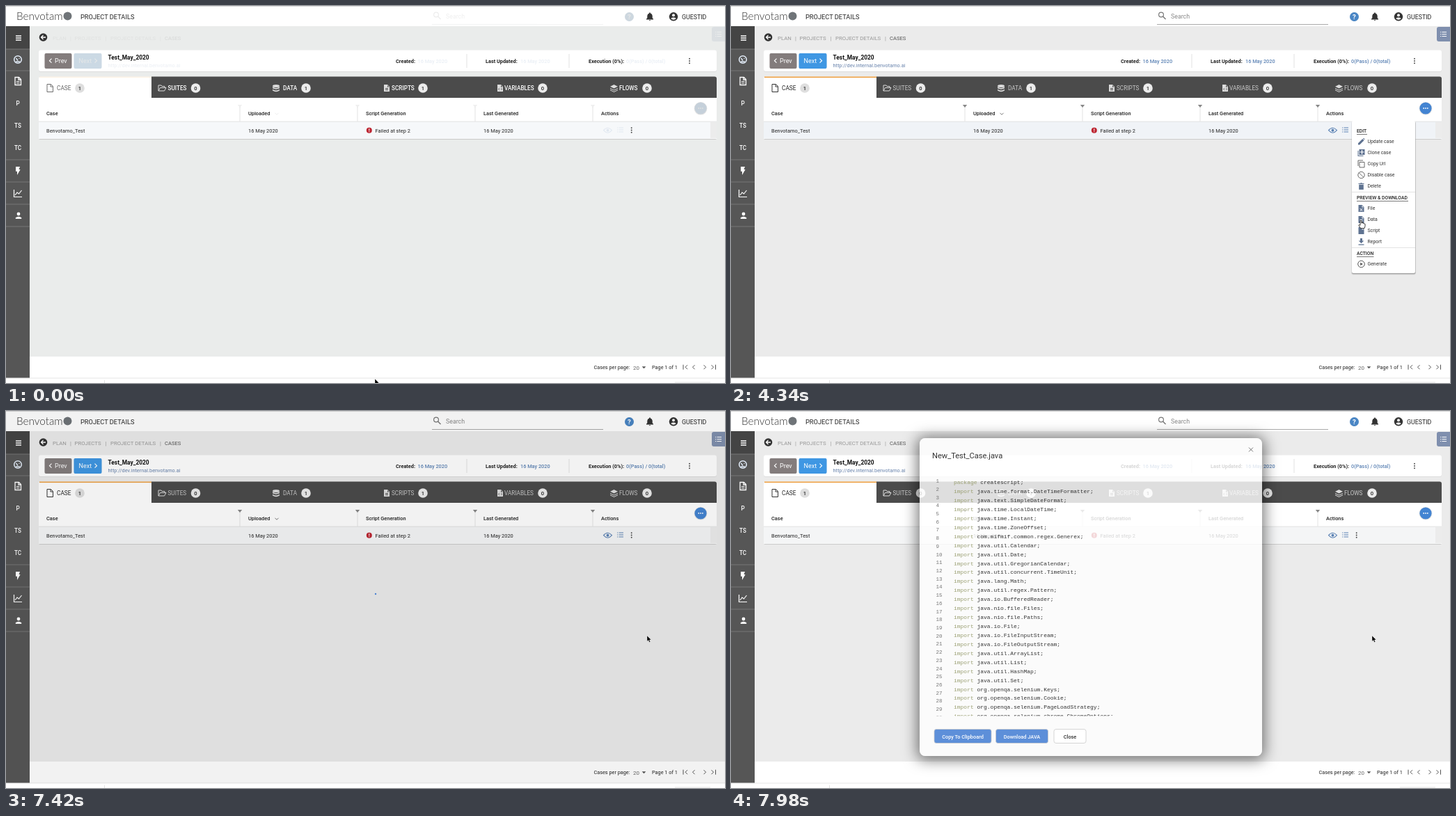
Write an HTML page that moves like this. It is 1033 px wide and 542 px high and loops after 8 s.

```html
<!DOCTYPE html>
<html lang="en">
<head>
<meta charset="utf-8">
<title>Project details</title>
<style>
html, body { margin: 0; width: 100%; height: 100%; overflow: hidden; background: #fff; }
svg, #panel { position: absolute; left: 0; top: 0; }
svg { width: 1033px; height: 542px; font-family: Roboto, sans-serif; }
text { white-space: pre; }
.code { font-family: "Liberation Mono", monospace; }
.logo { font-family: Lato, sans-serif; }
.pale .soft { opacity: .13; }
.tab { fill: #c9c9c9; }
.pale .tab { fill: #fff; font-weight: 500; }
.pale .dark { opacity: .7; }
#panel { left: 271px; top: 39px; width: 492px; height: 457px; border-radius: 8px;
  background: rgba(255,255,255,.82); box-shadow: 0 2px 20px 4px rgba(0,0,0,.5); }
</style>
</head>
<body>
<svg id="page"></svg>
<div id="panel"></div>
<svg id="top"></svg>
<script>
const $ = id => document.getElementById(id);
const rect = (x, y, w, h, fill, r = 0, more = '') =>
  `<rect x="${x}" y="${y}" width="${w}" height="${h}" fill="${fill}" rx="${r}" ${more}/>`;
const circle = (x, y, r, fill, more = '') => `<circle cx="${x}" cy="${y}" r="${r}" fill="${fill}" ${more}/>`;
// y is the middle of the capitals
const text = (x, y, s, size, fill = '#222', weight = 400, more = '') =>
  `<text x="${x}" y="${y + size * .36}" font-size="${size}" fill="${fill}" font-weight="${weight}" ${more}>${s}</text>`;
const group = (cls, ...parts) => `<g class="${cls}">${parts.join('')}</g>`;
// icon paths are centred on 0,0
const solid = (x, y, d, fill, more = '') =>
  `<path transform="translate(${x} ${y})" d="${d}" fill="${fill}" fill-rule="evenodd" ${more}/>`;
const line = (x, y, d, color, width = 1) =>
  solid(x, y, d, 'none', `stroke="${color}" stroke-width="${width}"`);
const dots = (x, y, color) => [-3.3, 0, 3.3].map(d => circle(x, y + d, .95, color)).join('');

const DOC = 'M-4-5.5H1.5L4.5-2.5V5.5H-4ZM1-5V-2H4.5';
const SHEET = 'M-4-5H1L4-2V5H-4ZM1-4V-1.5H3.4Z';
const LIST = 'M-4.5-3h1.2M-2-3H4.5M-4.5 0h1.2M-2 0H4.5M-4.5 3h1.2M-2 3H4.5';
const ICON = {
  folder: (x, y, c) => line(x, y, 'M-5 4V-4H-1L0-2.5H4V-.5M-5 4L-2.5-.5H6L3.5 4Z', c),
  data: (x, y, c) => solid(x, y, 'M-5-3A5 2 0 0 1 5-3A5 2 0 0 1-5-3ZM-5-1.7Q0 1.5 5-1.7V.3Q0 3-5 .3ZM-5 1.8Q0 5 5 1.8V3.5Q0 7-5 3.5Z', c),
  script: (x, y, c) => solid(x, y, SHEET + 'M-2 0H2V1H-2ZM-2 2H2V3H-2Z', c),
  code: (x, y, c) => solid(x, y, SHEET, c) + line(x, y, 'M-1 0L-2.5 1.5L-1 3M1 0L2.5 1.5L1 3', '#4a4a4a', .8),
  flows: (x, y, c) => solid(x, y, 'M0-5L5.5-2.3L0 .4L-5.5-2.3ZM-5.5 0L0 2.6L5.5 0V1L0 3.6L-5.5 1ZM-5.5 2.3L0 5L5.5 2.3V3.2L0 5.9L-5.5 3.2Z', c)
};
const BLUE = '#5b82b4', SLATE = '#5f7391';

function header() {
  return rect(0, 0, 1033, 29, '#fff') + rect(0, 0, 1033, 1, '#d9d9d9') +
    text(15, 14.7, 'Benvotam', 15.3, '#333', 300, 'class="logo"') + circle(88.5, 14.5, 6, '#6f7478') +
    text(107, 15.7, 'PROJECT DETAILS', 9.25) +
    group('soft', circle(618, 12.5, 3.4, 'none', 'stroke="#777" stroke-width="1.2"'),
      line(618, 12.5, 'M2.5 2.5L6.5 6.5', '#777', 1.4), text(632, 15, 'Search', 8.8, '#888'),
      rect(612, 26, 246, 1, '#aaa')) +
    circle(895.5, 15.5, 6.5, '#e2e4e4') +
    group('soft', circle(895.5, 15.5, 6.5, '#4a86c5'), text(893, 15.6, '?', 9.5, '#fff', 700)) +
    solid(925, 15.5, 'M-5 4V3L-3.7 1.7V-1.5Q-3.5-4.3-.9-5V-5.5Q0-6.8.9-5.5V-5Q3.5-4.3 3.7-1.5V1.7L5 3V4ZM-1.3 4.7H1.3Q0 7-1.3 4.7', '#333') +
    circle(959, 15.3, 6.2, '#333') + circle(959, 13.2, 2, '#fff') +
    solid(959, 15.3, 'M-3.8 2.7Q0-.2 3.8 2.7Q0 6.3-3.8 2.7', '#fff') +
    text(971, 15.7, 'GUESTID', 8.8);
}

function sidebar() {
  const w = '#fff';
  return rect(0, 29, 34, 506, '#565656') + rect(0, 29, 34, 33, '#444') +
    [62, 93, 221, 253, 285, 317].map(y => rect(0, y - .5, 34, 1, '#777')).join('') +
    line(18, 46, 'M-4-3H4M-4 0H4M-4 3H4', w, 1.4) +
    circle(17, 77, 5.3, 'none', 'stroke="#e4eefa" stroke-width="1.5"') +
    line(17, 77, 'M0 1.5L-2.5-2M-3 3H3M2-2V-1', '#e4eefa', 1.4) +
    line(17, 108, DOC, w, 1.3) + line(17, 108, 'M-2 .5H2.5M-2 2.8H2.5', w) +
    ['P', 'TS', 'TC'].map((s, i) => text(17, 140 + 32 * i, s, 8.2, w, 500, 'text-anchor="middle"')).join('') +
    solid(17, 237, 'M-3-6H3L1.5-2H3.6L-1 6V.7H-3Z', w) +
    line(17, 269, 'M-5.5-5V5.5H6M-4 3L-1-1L1.5 1L5.5-4', w, 1.2) +
    circle(18, 299, 2.4, w) + solid(18, 302, 'M-4.2 4V2.3Q0-1 4.2 2.3V4Z', w);
}

function crumbs() {
  const items = [[67, 'PLAN'], [92, '|'], [98.5, 'PROJECTS'], [142.5, '|'], [150, 'PROJECT DETAILS'], [221, '|']];
  return circle(53.5, 45, 5.8, '#333') + line(53.5, 45, 'M3.5 0H-3M0-3L-3 0L0 3', '#fff', 1.3) +
    group('soft', ...items.map(([x, s]) => text(x, 46, s, 7.8, '#999')), text(228, 46, 'CASES', 7.6, '#555'),
      rect(1014, 30, 23, 21, '#7f8fae', 3), line(1023.5, 40.5, LIST, '#fff', 1.1));
}

function card() {
  const meta = [[560, 'Created:', 591.5, '16 May 2020'], [689, 'Last Updated:', 739, '16 May 2020'],
    [837, 'Execution (0%):', 891, '0(Pass) / 0(total)']];
  return rect(47, 64, 974, 31, '#dcdcdc', 3) + rect(47, 63.5, 974, 30.5, '#fff', 3) +
    rect(55.5, 68, 39, 22, '#837c7c', 2) + line(64, 78.7, 'M1.5-3L-1.5 0L1.5 3', '#fff', 1.2) + text(70, 79, 'Prev', 9, '#fff') +
    rect(97.5, 68, 40, 22, '#e1e4e5', 2) +
    group('soft', rect(97.5, 68, 40, 22, '#3f97e3', 2), text(104.5, 79, 'Next', 9, '#fff'), line(129, 78.7, 'M-1.5-3L1.5 0L-1.5 3', '#fff', 1.2)) +
    text(146.5, 74, 'Test_May_2020', 8.4, '#111', 700) +
    group('soft', text(146.5, 85.7, 'http://dev.internal.benvotamo.ai', 7.35, '#6681ab')) +
    meta.map(([x, a, x2, b]) => text(x, 79.5, a, 7.35, '#222', 700) +
      group('soft', text(x2, 79.5, b, 7.35, BLUE, 500))).join('') +
    rect(661.5, 69, 1, 20, '#e2e2e2') + rect(808.5, 69, 1, 20, '#e2e2e2') + dots(982, 79, '#444');
}

function tabs() {
  const list = [[224, 'folder', 232.5, 'SUITES', 272.5, 0], [388, 'data', 398, 'DATA', 431, 1],
    [547, 'script', 554, 'SCRIPTS', 599, 1], [710, 'code', 716, 'VARIABLES', 771, 0], [873.5, 'flows', 881, 'FLOWS', 921, 0]];
  const badge = (x, n, fill) => circle(x, 118, 6.8, fill) + text(x, 118.2, n, 7.6, '#222', 500, 'text-anchor="middle"');
  return `<path d="M209 101.500H1018Q1021 101.500 1021 104.500V133H209Z" fill="#4b4b4b"/>` +
    `<path d="M47 133V104.500Q47 101.500 50 101.500H209V133Z" fill="#fff"/>` +
    group('soft', rect(48, 101.5, 161, 1.6, '#eda043')) +
    group('dark', line(63, 118, DOC, '#333'), text(73, 118.3, 'CASE', 8.3)) + badge(106, 1, '#dedede') +
    list.map(([ix, icon, x, s, bx, n]) => ICON[icon](ix, 118, '#dcdcdc') +
      text(x, 118.2, s, 8.2, '', 400, 'class="tab"') + badge(bx, n, '#ececec')).join('');
}

function table() {
  const heads = [[58, 'Case'], [348, 'Uploaded'], [517, 'Script Generation'], [686, 'Last Generated'], [855, 'Actions']];
  const cells = [[58, 'Benvotamo_Test'], [348, '16 May 2020'], [530.5, 'Failed at step 2'], [686, '16 May 2020']];
  return rect(47, 133, 974, 59, '#c9c9c9', 2) + rect(47, 132, 974, 59, '#fff') +
    rect(47, 166, 974, 24.5, '#fff', 0, 'id="row"') + rect(47, 165.7, 974, .8, '#ddd') +
    rect(1012, 167, 9, 23, '#ececec') +
    [336, 505, 674, 843].map(x => rect(x - .5, 145, 1, 21, '#e4e4e4') + `<g class="soft">${solid(x, 144, 'M-3.200-2H3.200L0 2Z', '#888')}</g>`).join('') +
    heads.map(([x, s]) => text(x, 154.7, s, 7.4, '#222', 500)).join('') +
    group('soft', line(389, 155, 'M-2.500-1.200L0 1.300L2.500-1.200', '#777')) +
    cells.map(([x, s]) => text(x, 178.9, s, 7.45, '#222')).join('') +
    circle(521.8, 178.7, 4, '#bd2733') + rect(521.3, 176.2, 1, 3.3, '#fff') + rect(521.3, 180.2, 1, 1, '#fff') +
    group('soft', line(864.5, 178.7, 'M-6 0Q0-7 6 0Q0 7-6 0Z', BLUE, 1.1), circle(864.5, 178.7, 2, BLUE), line(882.5, 178, LIST, BLUE, 1.2)) +
    circle(898.5, 178.5, 6.8, '#e0e0e0', 'id="halo"') + dots(898.7, 178.5, '#444') +
    circle(998, 147.3, 9.3, '#e0e0e0') + circle(998, 147, 8.6, '#dadcdc') +
    group('soft', circle(998, 147, 8.6, '#4384d2'), ...[-2.8, 0, 2.8].map(d => circle(998 + d, 147, .9, '#fff')));
}

function pager() {
  return rect(34, 504, 999, 31, '#fff') + rect(0, 534.5, 1033, 1, '#e6e6e6') +
    rect(141, 538, 1, 4, '#e2e2e2') + rect(961, 540, 51, 2, '#f1f1f1') +
    text(844.5, 519.7, 'Cases per page:', 7.3) + text(901, 519.7, '20', 8, '#666') + solid(916.5, 519.7, 'M-2.800-1.500H2.800L0 1.500Z', '#555') +
    text(928, 519.7, 'Page 1 of 1', 7.3) +
    line(976, 519.2, 'M-3-3.500V3.500M3-3L0 0L3 3', '#555') + line(988, 519.2, 'M1.500-3L-1.500 0L1.500 3', '#555') +
    line(1004, 519.2, 'M-1.500-3L1.500 0L-1.500 3', '#555') + line(1016.5, 519.2, 'M3-3.500V3.500M-3-3L0 0L-3 3', '#555');
}

function menu() {
  const head = (y, s, w) => text(899, y, s, 6.75, '#222', 500) + rect(899, y + 4, w, .8, '#555');
  const items = [[195, 'Update case'], [211, 'Clone case'], [227, 'Copy Url'], [243, 'Disable case'], [259, 'Delete'],
    [291, 'File'], [307, 'Data'], [323, 'Script'], [339, 'Report'], [371, 'Generate']];
  const x = 905.5;
  return rect(891, 166, 93, 220.5, '#000', 3, 'opacity=".08"') + rect(892, 166, 91.5, 219.5, '#aaa', 2) +
    rect(892, 165, 91, 219, '#fff', 2) + rect(892, 267, 91, .8, '#ddd') + rect(892, 347, 91, .8, '#ddd') +
    head(180, 'EDIT', 15) + head(276, 'PREVIEW &amp; DOWNLOAD', 74) + head(356, 'ACTION', 24.5) +
    items.map(([y, s]) => text(914.5, y, s, 6.9, '#333', 400, `id="${s}"`)).join('') +
    solid(x, 195, 'M-4.500 4.500V2.300L1.800-4L4-1.800L-2.300 4.500ZM2.500-4.600L3.500-5.200L5-3.400L4.600-2.600Z', SLATE) +
    solid(x, 211, 'M-3-5H5V3H-3ZM.4-4V-1.600H-2V-.4H.4V2H1.600V-.4H4V-1.600H1.600V-4ZM-5-3H-4V4H3V5H-5Z', SLATE) +
    line(x, 227, 'M-2.500-2.500H4.500V5H-2.500ZM-4.500 3V-5H2.500', '#666') +
    circle(x, 243, 4.7, 'none', 'stroke="#666"') + line(x, 243, 'M-3.300-3.300L3.300 3.300', '#666') +
    solid(x, 259, 'M-4-4H-1.500L-1-4.800H1L1.500-4H4V-3H-4ZM-3.300-2.200H3.300V5H-3.300Z', SLATE) +
    solid(x, 291, SHEET, SLATE) + line(x, 291, 'M-1.800 0L1.800 4M1.800 0L-1.800 4', '#fff') +
    ICON.script(x, 307, SLATE) + solid(x, 323, SHEET, SLATE) +
    solid(x, 339, 'M-1.500-5H1.500V-1.500H3.800L0 2.300L-3.800-1.500H-1.500ZM-4 3.500H4V4.700H-4Z', SLATE) +
    circle(x, 371, 4.8, 'none', 'stroke="#555"') + solid(x, 371, 'M-1.300-2.300L2.300 0L-1.300 2.300Z', '#555');
}

function dialog() {
  const java = `time.format.DateTimeFormatter text.SimpleDateFormat time.LocalDateTime time.Instant time.ZoneOffset
    com.mifmif.common.regex.Generex util.Calendar util.Date util.GregorianCalendar util.concurrent.TimeUnit lang.Math
    util.regex.Pattern io.BufferedReader nio.file.Files nio.file.Paths io.File io.FileInputStream io.FileOutputStream
    util.ArrayList util.List util.HashMap util.Set`.split(/\s+/).map(s => s.startsWith('com.') ? s : 'java.' + s);
  const web = 'Keys Cookie PageLoadStrategy chrome.ChromeOptions'.split(' ').map(s => 'org.openqa.selenium.' + s);
  const lines = ['package createscript', ...[...java, ...web].map(s => 'import ' + s)];
  const code = lines.map((s, i) => {
    const [word, name] = s.split(' ');
    return text(320, 102.3 + i * 12.93, `<tspan fill="#9a9f72">${word}</tspan> ${name};`, 7.98, '#333');
  });
  const numbers = Array.from({length: 30}, (_, i) => text(294.5, 100.5 + i * 11.71, i < 9 ? i + 1 : i + 1, 7.5, '#777'));
  const button = (x, w, s, fill, ink) => rect(x, 457.5, w, 20, fill, 3, 'stroke="#ccc" stroke-width=".8"') +
    text(x + w / 2, 468, s, 7.35, ink, 500, 'text-anchor="middle"');
  return text(289, 64.5, 'New_Test_Case.java', 11.1, '#333') + line(747, 55.5, 'M-3-3L3 3M3-3L-3 3', '#777') +
    `<clipPath id="view"><rect x="280" y="95" width="470" height="343.500"/></clipPath>` +
    `<g class="code" clip-path="url(#view)">${code.join('')}${numbers.join('')}</g>` +
    button(292, 82, 'Copy To Clipboard', '#5d8fd9', '#fff') + button(380.5, 75, 'Download JAVA', '#5d8fd9', '#fff') +
    button(464, 46, 'Close', '#fff', '#333');
}

$('page').innerHTML = rect(0, 0, 1033, 535, '#ebebeb', 0, 'id="back"') + header() + sidebar() + crumbs() + card() +
  tabs() + table() + pager() + `<g id="menu">${menu()}</g>` + rect(0, 0, 1033, 535, '#000', 0, 'id="dim"') +
  circle(0, 0, 1.2, '#4a80d0', 'id="spin"');
$('top').innerHTML = `<g id="dialog">${dialog()}</g><g id="cursor">` +
  '<path id="arrow" d="M0 0V8.200L1.900 6.500L3.200 9.400L4.700 8.800L3.400 6H6Z" fill="#000" stroke="#fff" stroke-width=".4"/>' +
  '<path id="hand" d="M-1 .8Q0-.6 1 .8V4.300Q2-.0 3 4.500Q4 3.500 4.700 5Q6 4.500 6 6V8.500L5 11.700H-.3L-3.300 7.300Q-3 5.500-1 7.300Z" fill="#fff" stroke="#222" stroke-width=".9"/></g>';

const LOOP = 8000, STEP = 70;
const CLICK = 2310, CLOSE = 6930, DIM = 7350, DONE = 7910;
const PATH = [[0, 530, 536], [420, 530, 536], [1330, 896, 180], [2520, 896, 180], [4200, 905, 308],
  [4900, 905, 308], [6400, 918, 323], [6860, 918, 323], [7140, 921, 323], [LOOP, 921, 323]];
const smooth = (a, b, t) => {
  const k = Math.min(1, Math.max(0, (t - a) / (b - a)));
  return k * k * (3 - 2 * k);
};
const show = (id, on) => $(id).style.display = on ? '' : 'none';

function cursorAt(t) {
  const i = PATH.findIndex(p => p[0] > t), [a, x, y] = PATH[i - 1], [b, x2, y2] = PATH[i];
  const k = smooth(a, b, t);
  return [x + (x2 - x) * k, y + (y2 - y) * k];
}

function draw(now) {
  const t = Math.floor(now % LOOP / STEP) * STEP;
  const open = t >= CLICK && t < CLOSE, [x, y] = cursorAt(t);
  document.body.className = t < CLICK ? 'pale' : '';
  $('back').setAttribute('fill', t < 910 ? '#eaeceb' : '#ebebeb');
  $('row').setAttribute('fill', t < 1330 ? '#f6f8fa' : t < CLICK ? '#fff' : open ? '#f0f3f7' : '#f4f5f6');
  show('halo', t >= 1330 && t < CLICK);
  show('menu', open);
  $('Script').setAttribute('font-weight', x > 912 ? 700 : 400);

  $('dim').setAttribute('opacity', t < DONE ? .49 * smooth(DIM, DIM + 350, t) : t < DONE + STEP ? .2 : 0);
  const angle = -Math.PI / 2 - (t - 7420) / 420 * Math.PI / 3;
  $('spin').setAttribute('cx', 531 + 20 * Math.cos(angle));
  $('spin').setAttribute('cy', 283 + 20 * Math.sin(angle));
  show('spin', t >= 7420 && t < DONE);

  const fade = t < DONE ? 0 : t < DONE + STEP ? .45 : 1;
  $('panel').style.opacity = $('dialog').style.opacity = fade;

  const hand = t >= 1260 && t < CLOSE;
  show('hand', hand);
  show('arrow', !hand);
  $('cursor').setAttribute('transform', `translate(${x} ${y})`);
  requestAnimationFrame(draw);
}
requestAnimationFrame(draw);
</script>
</body>
</html>
```
